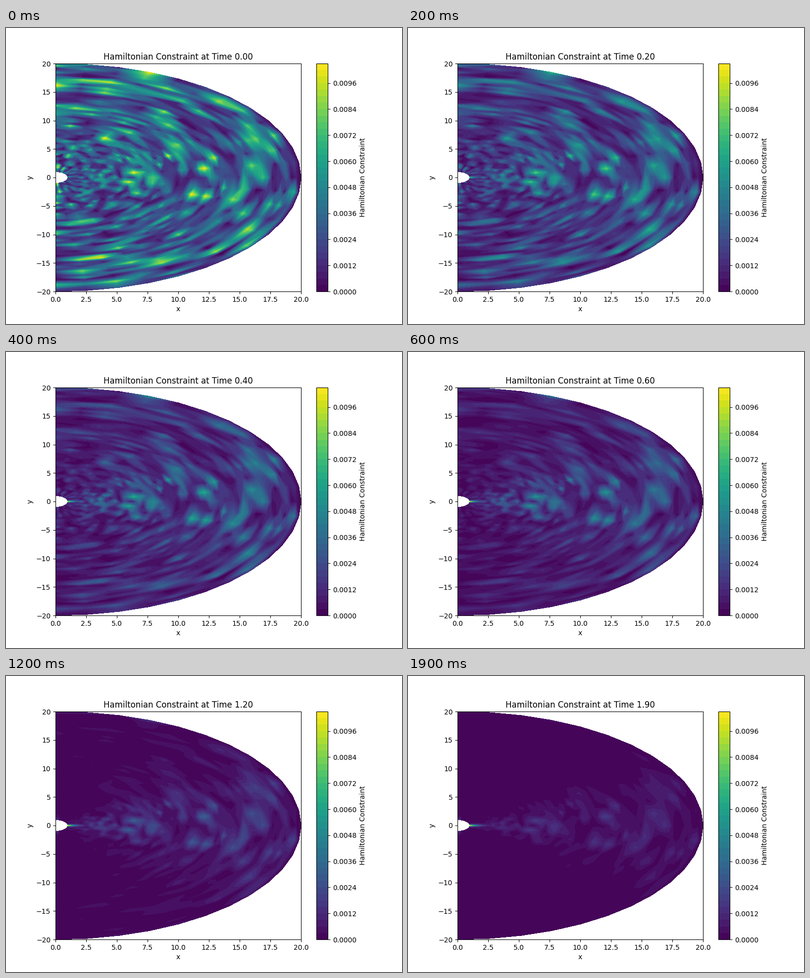
A matplotlib script for the animation above (2 s loop, 800 by 600 pixels).

```python
import numpy as np
import matplotlib.pyplot as plt
from matplotlib.animation import FuncAnimation

FRAMES = 20
STEP = 0.1
PEAK = 0.0104
LEVELS = np.arange(36) * 0.0003
NR, NA = 50, 25

radius = np.linspace(1, 20, NR)
angle = np.linspace(-np.pi / 2, np.pi / 2, NA)
R, A = np.meshgrid(radius, angle, indexing="ij")
X, Y = R * np.cos(A), R * np.sin(A)
polar = np.sin(A) ** 2

# Main spots: x, y and share of the peak value.
SPOTS = [
    (12.05, 1.6, 1.0), (6.4, 0.85, 1.0), (9.9, 5.1, 0.98),
    (16.2, 6.8, 0.82), (16.1, 1.8, 0.8), (15.7, -9.1, 0.9),
    (8.6, -14.5, 0.8), (13.4, 13.4, 0.9), (14.4, -3.9, 0.85),
    (17.7, -0.8, 0.0), (1.0, -17.2, 0.0),
]


def initial_field():
    rng = np.random.default_rng(7)
    noise = rng.normal(0, 0.0041, (NR + 2, NA))
    # Neighbouring radii are slightly correlated.
    noise = (noise[1:-1] + 0.35 * (noise[:-2] + noise[2:])) / 1.12
    field = np.abs(noise)
    for x, y, share in SPOTS:
        dr = (R - np.hypot(x, y)) / 0.6
        da = (A - np.arctan2(y, x)) / 0.09
        weight = np.exp(-dr ** 2 - da ** 2)
        field += weight * (share * PEAK - field)
    field[-1] *= polar[-1]
    return np.minimum(field, PEAK)


START = initial_field()

# Damping grows from the equator towards the poles.
rate = 0.8 + (1.8 + 1.5 * np.exp(-R / 4)) * polar
rate[-1] = 1.4

# Steady spike at the inner edge, and a late glow at its two poles.
core = 0.0098 * np.exp(-(R - 1) / 0.6 - np.abs(A) / 0.1)
glow = 0.0045 * np.exp(-(R - 1) / 0.4) * polar ** 20


def field_at(t):
    field = START * np.exp(-rate * t) * (0.85 + 0.15 * np.exp(-6 * t))
    field = np.maximum(field, core * (1 - np.exp(-6 * t)))
    field += glow * np.exp(-((t - 1.55) / 0.38) ** 2)
    return np.clip(field, 1e-5, PEAK)


fig, ax = plt.subplots(figsize=(8, 6), dpi=100)


def draw(frame):
    t = frame * STEP
    ax.clear()
    filled = ax.contourf(X, Y, field_at(t), levels=LEVELS, cmap="viridis")
    ax.set(xlim=(0, 20), ylim=(-20, 20), xlabel="x", ylabel="y",
           title=f"Hamiltonian Constraint at Time {t:.2f}")
    return filled


fig.colorbar(draw(0), ax=ax, label="Hamiltonian Constraint")


def update(frame):
    draw(frame)
    return []


anim = FuncAnimation(fig, update, frames=FRAMES, interval=100,
                     init_func=lambda: [], repeat=True, repeat_delay=0)
plt.show()
```
